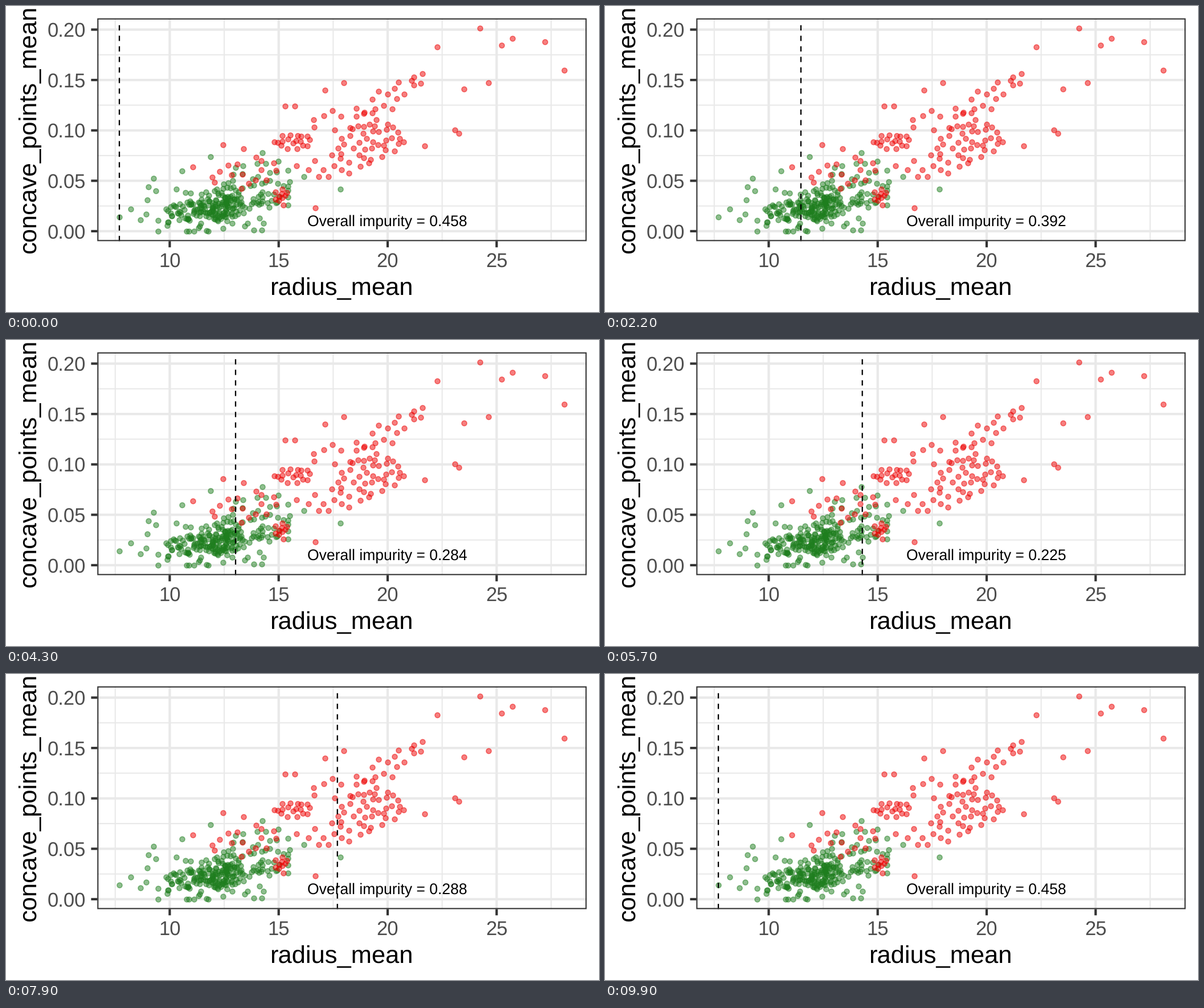
These frames come from a looping animation (1041x538 px, 10 s). A matplotlib script:

```python
import numpy as np
import matplotlib.pyplot as plt
from matplotlib.animation import FuncAnimation
from matplotlib.patches import Rectangle

W, H, DPI = 1041, 538, 100
PX = 72 / DPI  # points per pixel
FRAMES, INTERVAL = 100, 100

LEFT, RIGHT, TOP, BOTTOM = 160.3, 1019.3, 21.7, 413.4
GRID, DARK, LABEL = "#E9E9E9", "#333333", "#4D4D4D"
RED, GREEN = (238 / 255, 0, 0, 0.5), (30 / 255, 126 / 255, 30 / 255, 0.5)

plt.rcParams["font.family"] = "Liberation Sans"
plt.rcParams["text.hinting"] = "none"
plt.rcParams["lines.scale_dashes"] = False

rng = np.random.default_rng(12)


def sx(v):
    return 287.4 + (v - 10) * 38.26


def sy(v):
    return 395.9 - v * 1772


def blob(n, cx, cy, dx, dy, slope=0.0, gap=6):
    """Points spread over a sheared ellipse, mostly kept gap pixels apart."""
    pts = []
    for _ in range(n):
        for _ in range(20):
            a, r = rng.uniform(0, 2 * np.pi), np.sqrt(rng.uniform())
            x = r * np.cos(a) * dx
            p = np.array([cx + x, cy + r * np.sin(a) * dy + slope * x])
            if all(np.hypot(*(p - q)) > gap for q in pts):
                break
        pts.append(p)
    return np.array(pts)


def cloud(n, cx, cy, dx, dy, slope):
    """Normal scatter around a sloping line; values below zero rest on zero."""
    x = np.clip(rng.normal(cx, dx, n), 225, 495)
    y = cy + slope * (x - cx) + rng.normal(0, dy, n)
    return np.column_stack([x, np.minimum(y, sy(0))])


# Outlying points that give the scatter its outline
red_far = [(832, 39), (889, 57), (946, 63), (869.5, 69), (757, 72), (980, 113),
           (847, 135), (804, 146), (788, 218), (795, 224), (735, 246),
           (731, 119), (712, 131), (593, 135), (560, 148), (490, 176),
           (507, 176), (381, 244), (417, 251), (328, 283), (543, 355)]
green_far = [(199, 371), (219, 357), (250, 318), (259, 303), (309, 290),
             (359, 265), (450, 258), (523, 300), (587, 322)]

reds = np.vstack([
    red_far,
    blob(14, 678, 158, 52, 24, -0.5, 12),
    blob(12, 595, 198, 75, 20, -0.1, 12),
    blob(36, 638, 238, 64, 32, -0.1, 9),
    blob(18, 504, 238, 34, 15),
    blob(14, 568, 280, 70, 24, 0, 12),
    blob(16, 420, 295, 62, 27, -0.2, 9),
    blob(10, 483, 330, 12, 22)])

greens = np.vstack([
    green_far,
    cloud(190, 370, 355, 53, 20, -0.15),
    blob(36, 375, 354, 45, 17, -0.1, 5),
    blob(22, 445, 305, 65, 38, -0.1, 10)])

fig = plt.figure(figsize=(W / DPI, H / DPI), dpi=DPI, facecolor="white")
ax = fig.add_axes([0, 0, 1, 1])
ax.set_xlim(0, W)
ax.set_ylim(H, 0)
ax.axis("off")


def line(x, y, color, width, z):
    return ax.plot(x, y, color=color, lw=width * PX, zorder=z, snap=False,
                   solid_capstyle="butt")[0]


def label(x, y, s, size, color="black", **kw):
    return ax.text(x, y, s, fontsize=size * PX, color=color, va="baseline",
                   zorder=6, **kw)


def dots(xy, color, z):
    ax.scatter(xy[:, 0], xy[:, 1], s=(9 * PX) ** 2, facecolor=[color],
               edgecolor=[color], lw=1.54 * PX, zorder=z, snap=False)


# Grid, minor lines first
for v in np.arange(7.5, 28, 5):
    line([sx(v)] * 2, [TOP, BOTTOM], GRID, 2.1, 1)
for v in np.arange(0.025, 0.2, 0.05):
    line([LEFT, RIGHT], [sy(v)] * 2, GRID, 2.1, 1)
for v in (10, 15, 20, 25):
    line([sx(v)] * 2, [TOP, BOTTOM], GRID, 4.2, 1.5)
    line([sx(v)] * 2, [BOTTOM, BOTTOM + 10.9], DARK, 4.2, 2)
    label(sx(v), 458.2, str(v), 34.7, LABEL, ha="center")
for v in np.arange(0, 0.21, 0.05):
    line([LEFT, RIGHT], [sy(v)] * 2, GRID, 4.2, 1.5)
    line([LEFT - 10.9, LEFT], [sy(v)] * 2, DARK, 4.2, 2)
    label(140.4, sy(v) + 12.3, f"{v:.2f}", 34.7, LABEL, ha="right")

dots(greens, GREEN, 3)
dots(reds, RED, 3.5)

ax.add_patch(Rectangle((LEFT + 1, TOP + 1), RIGHT - LEFT - 2, BOTTOM - TOP - 2,
                       fill=False, ec=DARK, lw=2.1 * PX, zorder=5, snap=False))

label((LEFT + RIGHT) / 2 - 0.8, 507.3, "radius_mean", 43.5, ha="center")
label(52.6, (TOP + BOTTOM) / 2, "concave_points_mean", 43.5, ha="center",
      rotation=90, rotation_mode="anchor")

split = line([sx(7.7)] * 2, [BOTTOM, sy(0.205)], "black", 2.3, 4)
split.set_linestyle((0, (9.26 * PX, 9.26 * PX)))
split.set_dash_capstyle("butt")
note = label(669.5, 387.8, "", 26.5, ha="center")

# Key frames: the split climbs through the sorted radii, then jumps back
KEYS = [0, 2, 13, 30, 43, 66, 70, 88, 94, 98, 99]
SPLIT = [199, 241, 318, 367, 403, 483, 505.5, 658, 705, 869.5, 199]
IMPURITY = [0.458, 0.454, 0.423, 0.364, 0.284, 0.187, 0.208, 0.369, 0.418,
            0.450, 0.458]


def draw(i):
    x = np.interp(i, KEYS, SPLIT)
    split.set_xdata([x, x])
    note.set_text(f"Overall impurity = {np.interp(i, KEYS, IMPURITY):.3f}")
    return split, note


anim = FuncAnimation(fig, draw, frames=FRAMES, interval=INTERVAL, repeat=True)
plt.show()
```
